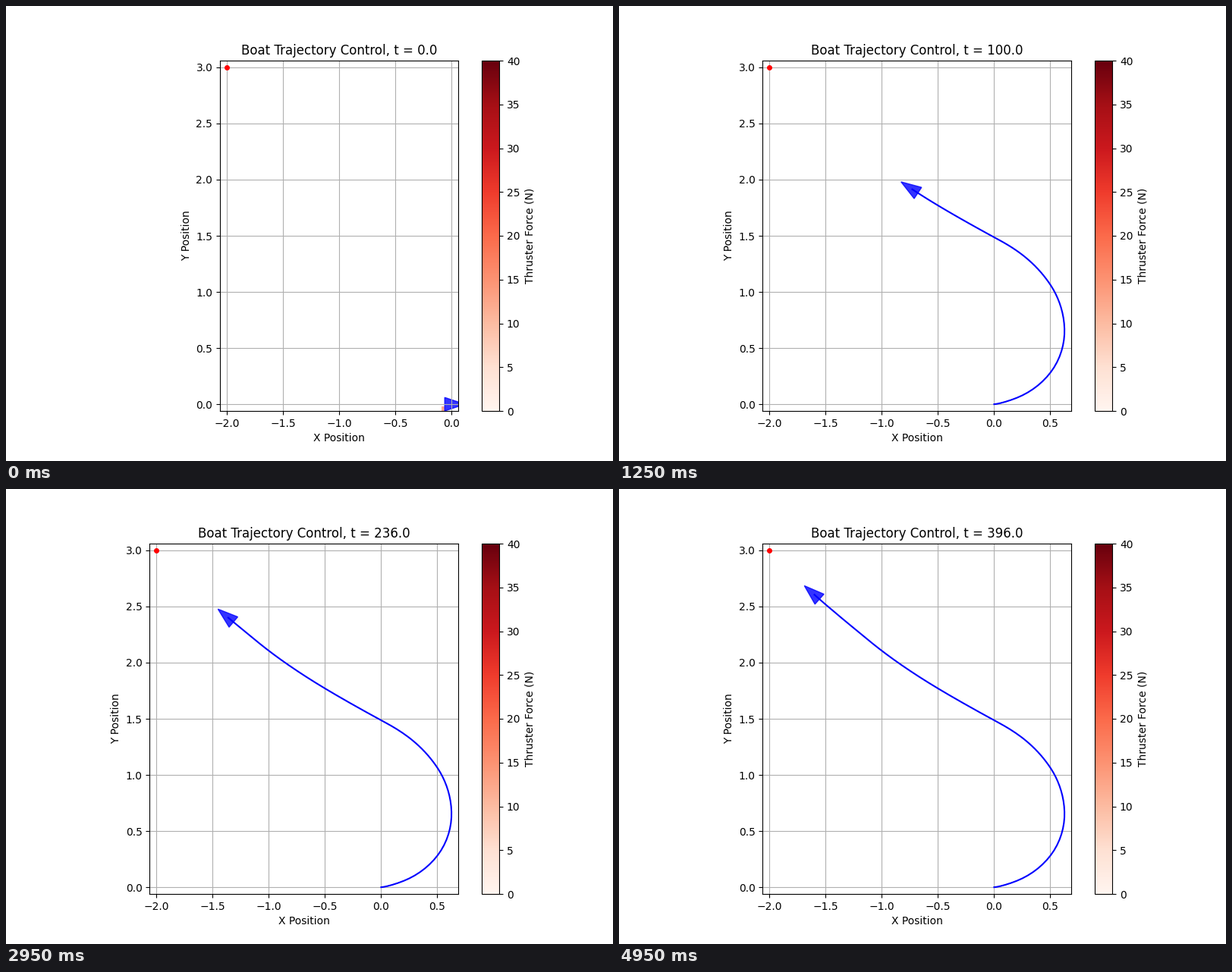
Write a matplotlib script that moves like this. It is 800 by 600 pixels and loops after 5 s.

```python
import numpy as np
import matplotlib.pyplot as plt
from matplotlib.animation import FuncAnimation
from matplotlib.cm import ScalarMappable
from matplotlib.colors import Normalize
from matplotlib.patches import Polygon
from matplotlib.ticker import MultipleLocator

FRAMES, INTERVAL = 100, 50
SECONDS_PER_FRAME = 4.0
MARGIN = 0.06
GOAL = np.array([-2.0, 3.0])

# time, x, y, course in degrees
WAYPOINTS = np.array([
    [0, 0, 0, 0],
    [5.5, 0.2276, 0.068, 24],
    [11.85, 0.4977, 0.2776, 52],
    [19.8, 0.626, 0.6625, 91],
    [29.4, 0.4977, 1.0677, 124],
    [48, 0.045, 1.462, 151.5],
    [100, -0.729, 1.914, 146.5],
    [188, -1.224, 2.287, 141],
    [236, -1.361, 2.400, 140],
    [308, -1.496, 2.514, 139.3],
    [396, -1.600, 2.605, 138.3],
])
times, points = WAYPOINTS[:, 0], WAYPOINTS[:, 1:3]
course = np.radians(WAYPOINTS[:, 3])

# The boat slows with the square of its distance to the goal.
speed = 0.004 * ((points - GOAL) ** 2).sum(axis=1)
speed[0] = 0.015
velocity = speed[:, None] * np.column_stack([np.cos(course), np.sin(course)])


def trajectory(t):
    """Cubic Hermite positions and velocities at the times t."""
    t = np.atleast_1d(t)
    i = np.clip(np.searchsorted(times, t, side="right") - 1, 0, len(times) - 2)
    span = (times[i + 1] - times[i])[:, None]
    u = (t - times[i])[:, None] / span
    p0, p1 = points[i], points[i + 1]
    m0, m1 = span * velocity[i], span * velocity[i + 1]
    pos = (p0 + (p1 - p0) * (3 * u**2 - 2 * u**3)
           + m0 * (u**3 - 2 * u**2 + u) + m1 * (u**3 - u**2))
    vel = ((p1 - p0) * (6 * u - 6 * u**2)
           + m0 * (3 * u**2 - 4 * u + 1) + m1 * (3 * u**2 - 2 * u)) / span
    return pos, vel


HULL = np.array([[0.12, 0], [-0.06, 0.06], [-0.06, -0.06]])
THRUSTER = np.array([[-0.09, -0.02], [-0.06, -0.02],
                     [-0.06, -0.06], [-0.09, -0.06]])


def place(shape, pos, angle):
    c, s = np.cos(angle), np.sin(angle)
    return shape @ np.array([[c, s], [-s, c]]) + pos


fig, ax = plt.subplots(figsize=(8, 6), dpi=100)
ax.set_aspect("equal")
ax.set_ylim(-MARGIN, 3 + MARGIN)
ax.xaxis.set_major_locator(MultipleLocator(0.5))
ax.yaxis.set_major_locator(MultipleLocator(0.5))
ax.set_xlabel("X Position")
ax.set_ylabel("Y Position")
ax.grid(True)

force_map = ScalarMappable(Normalize(0, 40), "Reds")
fig.colorbar(force_map, ax=ax, label="Thruster Force (N)")

thruster = ax.add_patch(Polygon(THRUSTER, lw=0))
boat = ax.add_patch(Polygon(HULL, color="blue", alpha=0.8))
path, = ax.plot([], [], "b-", lw=1.5)
ax.plot(*GOAL, "ro", ms=4)


def update(frame):
    t = frame * SECONDS_PER_FRAME
    track, vel = trajectory(np.linspace(0, t, 4 * frame + 1))
    angle = np.arctan2(vel[-1, 1], vel[-1, 0])
    path.set_data(track[:, 0], track[:, 1])
    boat.set_xy(place(HULL, track[-1], angle))
    thruster.set_xy(place(THRUSTER, track[-1], angle))
    thruster.set_facecolor(force_map.to_rgba(12 * np.exp(-t / 12)))
    ax.set_xlim(GOAL[0] - MARGIN, track[:, 0].max() + MARGIN)
    ax.set_title(f"Boat Trajectory Control, t = {t:.1f}")
    return path, boat, thruster


anim = FuncAnimation(fig, update, frames=FRAMES, interval=INTERVAL,
                     init_func=lambda: update(0), repeat=True, repeat_delay=0)
plt.show()
```
